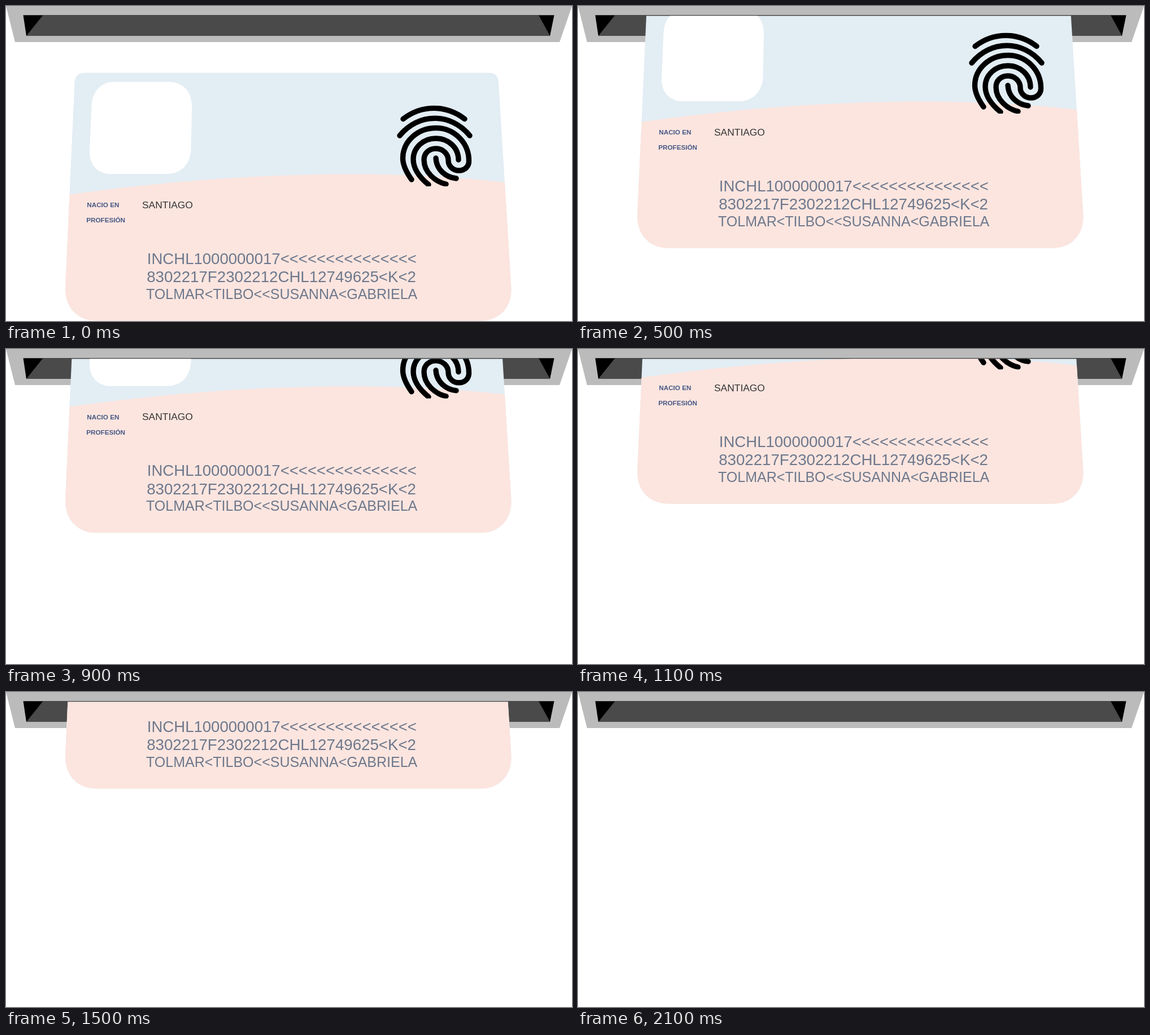
Write an HTML page that moves like this. It is 1002 px wide and 559 px high and loops after 2200 ms.

```html
<!DOCTYPE html>
<html lang="es">
<head>
<meta charset="utf-8">
<title>Card into slot</title>
<style>
  html, body { margin: 0; width: 100%; height: 100%; overflow: hidden; background: #fff; }
  svg { display: block; width: 100%; height: 100%; }
  text { font-family: "Liberation Sans", Arial, sans-serif; }
  .label { font-size: 11.7px; font-weight: bold; fill: #465885; }
  .value { font-size: 17.4px; fill: #333; }
  .code { fill: #6d788c; }
  .ridges { fill: none; stroke: #000; stroke-width: 9.4; stroke-linecap: round; stroke-linejoin: round; }
</style>
</head>
<body>
<svg viewBox="0 0 1002 559">
  <defs>
    <clipPath id="below"><rect y="17.6" width="1002" height="542"/></clipPath>
    <clipPath id="body">
      <path d="M139 118.5H855Q871 118.5 872 135L894.5 500C896 535 873 558.5 841 558.5H160C127 558.5 104 535 105 500L121.5 135Q122.5 118.5 139 118.5Z"/>
    </clipPath>
    <clipPath id="print"><rect x="680" y="170" width="160" height="150"/></clipPath>
  </defs>

  <g id="slot">
    <path fill="#bbb" d="M0 0H1002L980 64H16Z"/>
    <path d="M30.500 16.200H970.500L963 53H36Z"/>
    <path fill="#4a4a4a" d="M65.500 16.200H943L963 53H36Z"/>
  </g>

  <g clip-path="url(#below)">
    <g id="card">
      <g clip-path="url(#body)">
        <rect x="100" y="110" width="800" height="450" fill="#e3edf4"/>
        <path fill="#fce5df" d="M113 334.500C330 304 620 283 883 313L900 314V560H100V337Z"/>
      </g>
      <path fill="#fff" d="M192 134.500H288C313 134.500 330 152 329 180L327.500 255C326 282 309 298 285 298H186C162 298 147 282 148 256L151.500 176C153 152 168 134.500 192 134.500Z"/>
      <g class="ridges" clip-path="url(#print)">
        <path d="M703 200.500C736 175 779 175 812 200.500"/>
        <path d="M697 230C730 189 788 189 821 230"/>
        <path d="M718 308C708 294 702.500 281 702.500 270C702.500 240 729 216.500 761 216.500C793 216.500 819.500 242 819.500 275C819.500 285 812 292 802 292C791 292 783 284 783 274C783 262 773 253 761 253C749 253 740 261 740 273C740 295 760 312 779 316"/>
        <path d="M801 273C801 251 783 235 761 235C739 235 721 251 721 272C721 290 732 304 748 317"/>
        <path d="M761 270C762 290 778 304 797 306"/>
      </g>
      <text class="label" x="143.300" y="357">NACIO EN</text>
      <text class="label" x="142.200" y="384">PROFESIÓN</text>
      <text class="value" x="241" y="358.700">SANTIAGO</text>
      <g class="code">
        <text x="249.800" y="457.700" font-size="27.560">INCHL1000000017&lt;&lt;&lt;&lt;&lt;&lt;&lt;&lt;&lt;&lt;&lt;&lt;&lt;&lt;&lt;</text>
        <text x="249.200" y="490" font-size="27.660">8302217F2302212CHL12749625&lt;K&lt;2</text>
        <text x="248" y="519.500" font-size="25">TOLMAR&lt;TILBO&lt;&lt;SUSANNA&lt;GABRIELA</text>
      </g>
    </g>
  </g>
</svg>
<script>
  const LOOP = 2200, STEP = 100, RISE = 25.8;
  const card = document.getElementById("card");

  // The card climbs one notch every 100 ms.
  function draw(time) {
    const notch = Math.floor((time % LOOP) / STEP);
    card.setAttribute("transform", `translate(0 ${-notch * RISE})`);
  }

  const start = performance.now();
  function tick() {
    draw(performance.now() - start);
    requestAnimationFrame(tick);
  }
  tick();
</script>
</body>
</html>
```
